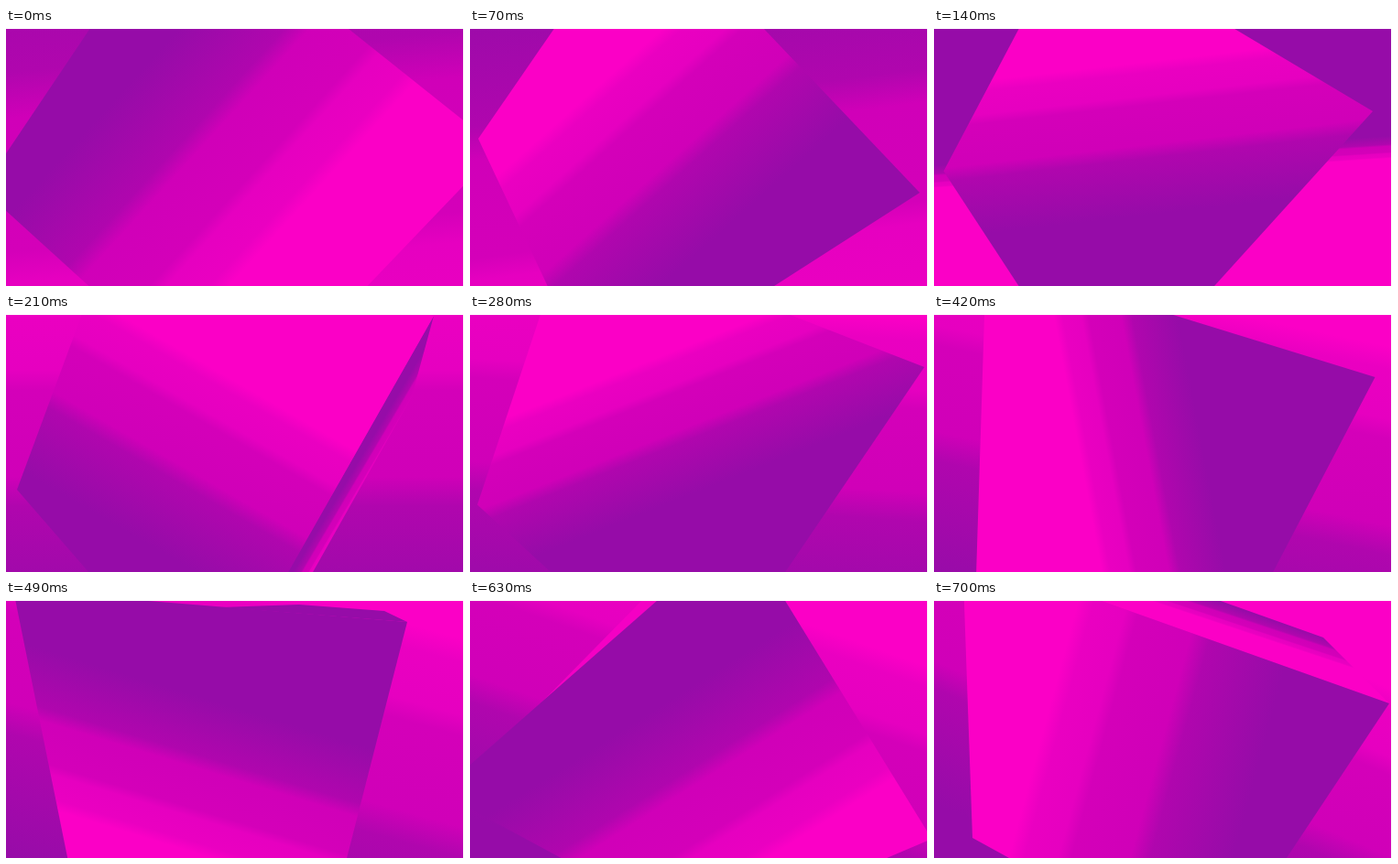
Recreate the animation shown at these times as an HTML page with a canvas. Size 500 by 282 pixels, loop 0.77 s.

```html
<!DOCTYPE html>
<html lang="en">
<head>
<meta charset="utf-8">
<title>Tumbling box</title>
<style>
html, body { margin: 0; width: 500px; height: 282px; overflow: hidden; background: #fff; }
canvas { display: block; }
</style>
</head>
<body>
<canvas id="stage" width="500" height="282"></canvas>
<script>
const ctx = document.getElementById('stage').getContext('2d');
const STEP = 70, STEPS = 11;

const RAMP = [
  [0, '#960ca8'], [.2, '#a409ab'], [.37, '#b006ae'], [.46, '#d000b8'],
  [.72, '#d400b9'], [.78, '#e600c0'], [.93, '#ea00c1'], [1, '#fb00c6']
];

// back: slope of the bands, then the heights at mid-width where purple and pink begin
// face: four corners; light: purple point, pink point
const poses = {
  0: { back: [-.09, -182, 380], face: [190, -146, 538, 132, 253, 430, -26, 176], light: [100, 98, 270, 253] },
  1: { back: [-.13, -76, 335], face: [188, -139, 491, 180, 142, 404, 9, 121], light: [305, 196, 166, 40] },
  3: { back: [0, 344, -18], face: [110, -73, 467, 2, 222, 434, 12, 192], light: [100, 220, 201, 45],
       side: [467, 2, 443, 90, 335, 282, 308, 282], sideLight: [391, 150, 408, 160] },
  5: { back: [.14, 338, -6], face: [106, -113, 525, 114, 270, 420, 4, 225], light: [375, 178, 161, 69] },
  7: { back: [.275, 355, -26], face: [8, -11, 438, 24, 347, 380, 87, 380], light: [210, 105, 162, 263],
       side: [235, 8, 320, 5, 413, 12, 438, 24], sideColor: '#960ca8' },
  9: { back: [.35, 325, -15], face: [295, -79, 504, 261, 257, 367, -34, 210], light: [185, 130, 294, 302],
       side: [205, 0, 188, 0, 80, 110], sideColor: '#f400c4' },
  10: { back: [.43, 330, -10], face: [31, -53, 497, 113, 304, 404, 42, 260], light: [352, 190, 123, 128],
        side: [180, 0, 310, 0, 425, 41, 497, 113], sideLight: [370, 22, 363, 43] }
};

const middle = (a, b) => a.map((v, i) => (v + b[i]) / 2);

function poseAt(step) {
  if (poses[step]) return poses[step];
  const a = poses[step - 1], b = poses[step + 1];
  return { back: middle(a.back, b.back), face: middle(a.face, b.face), light: middle(a.light, b.light) };
}

function ramp(points) {
  const gradient = ctx.createLinearGradient(...points);
  RAMP.forEach(stop => gradient.addColorStop(...stop));
  return gradient;
}

function backLight([slope, purple, pink]) {
  const dy = (pink - purple) / (1 + slope * slope), dx = -slope * dy;
  return [250 - dx / 2, purple - slope * dx / 2, 250 + dx / 2, purple - slope * dx / 2 + dy];
}

function polygon(points, fill) {
  ctx.beginPath();
  for (let i = 0; i < points.length; i += 2) ctx.lineTo(points[i], points[i + 1]);
  ctx.fillStyle = fill;
  ctx.fill();
}

ctx.beginPath();
ctx.rect(0, 1, 499, 281);
ctx.clip();

function draw() {
  const pose = poseAt(Math.floor(performance.now() / STEP) % STEPS);
  ctx.fillStyle = ramp(backLight(pose.back));
  ctx.fillRect(0, 0, 500, 282);
  if (pose.side) polygon(pose.side, pose.sideColor || ramp(pose.sideLight));
  polygon(pose.face, ramp(pose.light));
  requestAnimationFrame(draw);
}
draw();
</script>
</body>
</html>
```
